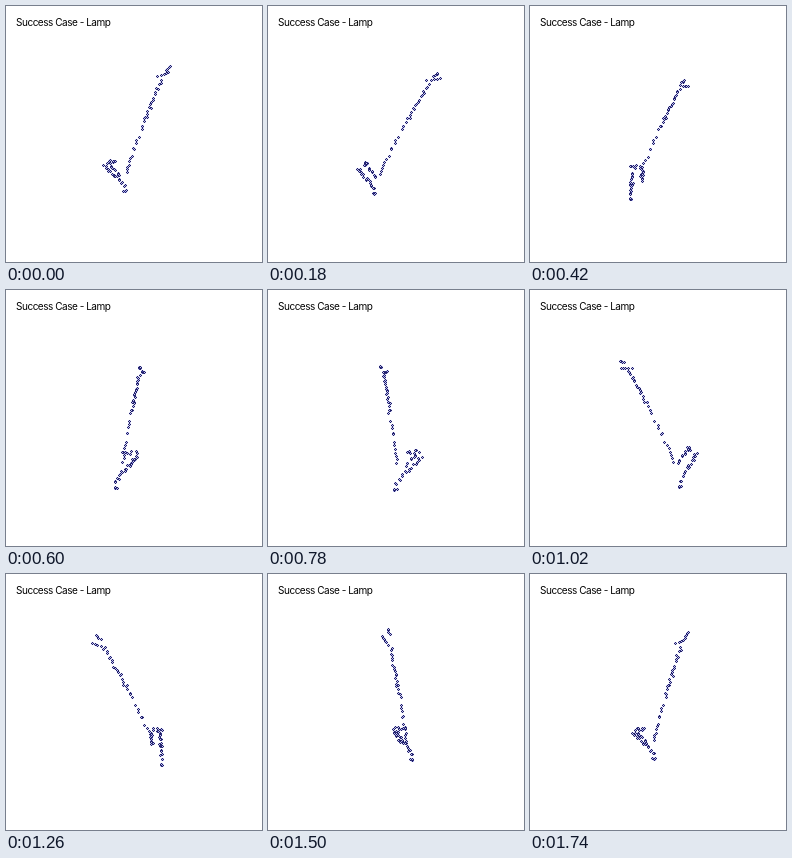
An HTML page with a canvas for the animation above (1800 ms loop, 256x256 px).

```html
<!DOCTYPE html>
<html lang="en">
<head>
<meta charset="utf-8">
<title>Turning lamp</title>
<style>
  html, body { margin: 0; width: 100%; height: 100%; overflow: hidden; background: #fff; }
  canvas { display: block; width: 256px; height: 256px; }
  h1 {
    position: absolute; left: 10px; top: 11px; margin: 0;
    font: 400 10px/11px Inter, "Liberation Sans", sans-serif;
    letter-spacing: -0.47px; white-space: nowrap; color: #000;
  }
</style>
</head>
<body>
<canvas id="stage" width="256" height="256"></canvas>
<h1>Success Case - Lamp</h1>
<script>
  const LOOP = 1800, STEP = 60, MID = 128, DIST = 230;
  const ctx = document.getElementById('stage').getContext('2d');

  let seed = 7;
  function random() {
    seed = (seed * 16807) % 2147483647;
    return seed / 2147483647;
  }

  const mix = (a, b, t) => a + (b - a) * t;
  const line = (from, to) => t => from.map((v, i) => mix(v, to[i], t));

  // The pole leans back along a slight curve; y counts from the turning centre.
  const pole = (top, bottom) => t => {
    const y = mix(top, bottom, t), u = y - 3, bend = 0.0008 * u * u;
    return [4 - 0.36 * u + bend, -3 - 0.42 * u + bend, y];
  };

  // Strews points along a path of [x, depth, y].
  function scatter(path, count, spread) {
    return Array.from({ length: count }, (_, i) =>
      path((i + random()) / count).map(v => v + (random() * 2 - 1) * spread));
  }

  const points = [
    // head
    ...scatter(line([20, 22, -52], [31, 31, -54]), 5, 0.6),
    ...scatter(line([27, 22, -57], [32, 27, -60]), 4, 0.8),
    // pole
    ...scatter(pole(-50, -5), 22, 1.2),
    ...scatter(pole(2, 43), 12, 1),
    // shade: rim, back edge, inner edge, tip
    ...scatter(line([-33.5, -19, 33], [-10, -25.5, 58]), 17, 1.2),
    ...scatter(line([-27, -12, 30], [-21, -25, 29]), 8, 1.5),
    ...scatter(line([-26, -12, 31], [-15, -14, 44]), 8, 1.2),
    ...scatter(line([-12, -25, 63], [-8, -26, 63]), 4, 0.6)
  ];

  function dot(x, y) {
    x = Math.round(x);
    y = Math.round(y);
    ctx.fillStyle = 'rgba(110, 110, 230, 0.25)';
    ctx.fillRect(x - 1, y - 1, 3, 3);
    ctx.fillStyle = '#1f1f63';
    ctx.fillRect(x - 1, y, 3, 1);
    ctx.fillRect(x, y - 1, 1, 3);
    ctx.fillStyle = '#c4c4f4';
    ctx.fillRect(x, y, 1, 1);
  }

  function draw(time) {
    const angle = Math.floor((time % LOOP) / STEP) * STEP / LOOP * 2 * Math.PI;
    const c = Math.cos(angle), s = Math.sin(angle);
    ctx.clearRect(0, 0, 256, 256);
    for (const [x, z, y] of points) {
      const k = DIST / (DIST + x * s - z * c);
      dot(MID + (x * c + z * s) * k, MID + y * k);
    }
  }

  const start = performance.now();
  function tick() {
    draw(performance.now() - start);
    requestAnimationFrame(tick);
  }
  tick();
</script>
</body>
</html>
```
